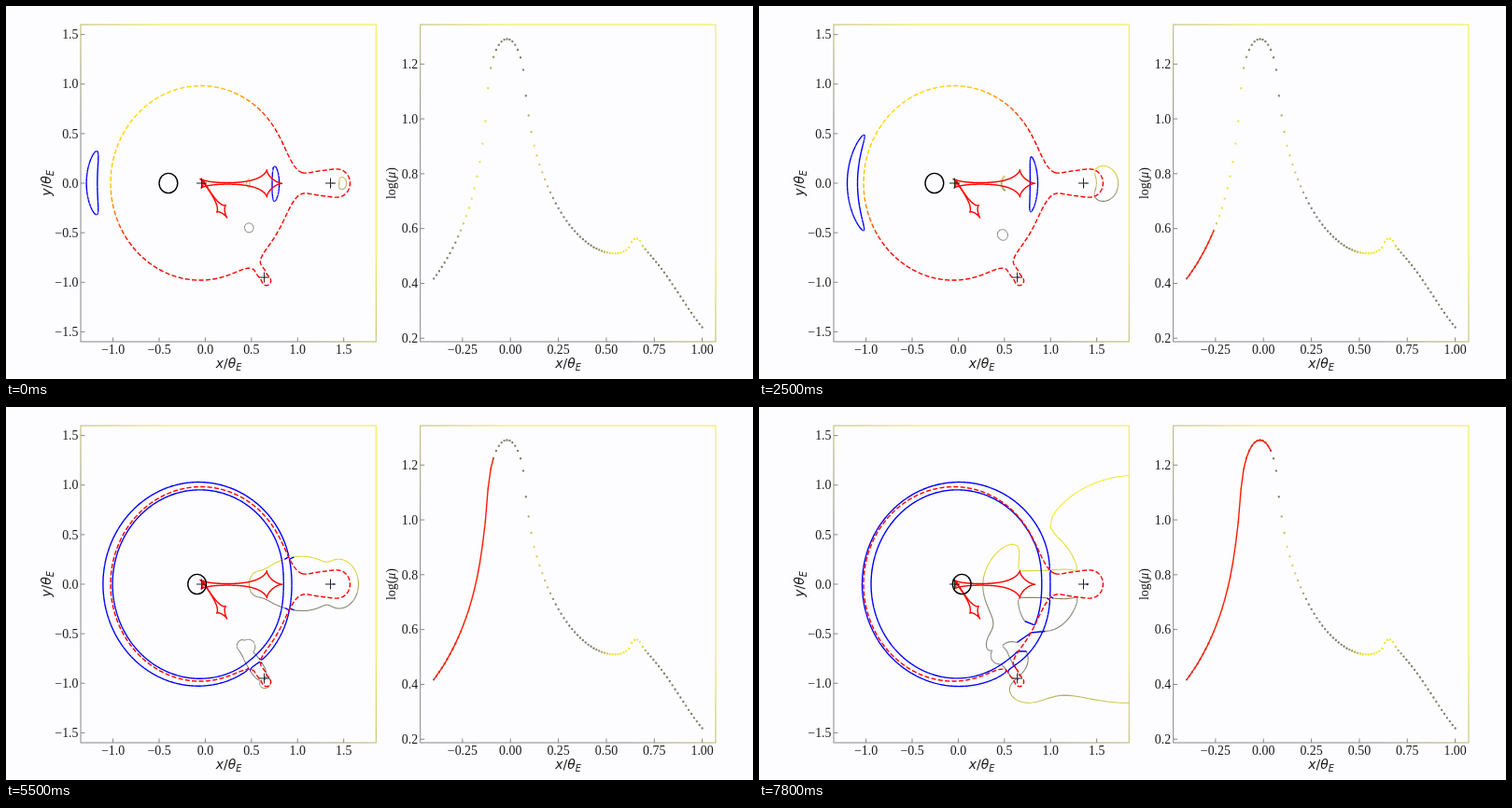
Recreate the animation shown at these times as an HTML page. Size 800 px wide and 400 px high, loop 8 s.

```html
<!DOCTYPE html>
<html lang="en">
<head>
<meta charset="utf-8">
<title>Triple lens images and light curve</title>
<style>
  html, body { margin: 0; width: 100%; height: 100%; overflow: hidden; background: #fdfdff; }
  svg { display: block; }
  path, ellipse { fill: none; stroke-linejoin: round; }
  text { font: 13.9px "Liberation Serif", serif; fill: #1c1c1c; }
  .math { font: italic 13.9px "DejaVu Sans", sans-serif; }
  .mid { text-anchor: middle; }
  .end { text-anchor: end; }
  .up { font-style: normal; }
  .sub { font-size: 9.7px; }
  #axes, #ticks { stroke-width: 1; }
  #ticks { stroke: #888; }
  #ghost { stroke: url(#olive); stroke-width: 1.1; }
  #image { stroke: #00f; stroke-width: 1.4; }
  #critical { stroke: #f00; stroke-width: 1.4; stroke-dasharray: 5.1 2.3; }
  #caustic { stroke: #f00; stroke-width: 1.4; }
  #star { stroke: #000; stroke-width: 1.4; }
  #lenses { stroke: #222; stroke-width: 1; }
  #dots { stroke: url(#dotTint); stroke-width: 2.4; stroke-linecap: round; }
  #trace { stroke: #ff1a08; stroke-width: 1.4; }
</style>
</head>
<body>
<svg width="800" height="400" viewBox="0 0 800 400">
  <defs>
    <clipPath id="box"><rect x="80" y="20" width="316.3" height="340"/></clipPath>
    <linearGradient id="edge" x1="0" y1="1" x2="1" y2="0">
      <stop offset=".35" stop-color="#858585"/><stop offset=".65" stop-color="#f0ea40"/>
    </linearGradient>
    <linearGradient id="olive" gradientUnits="userSpaceOnUse" x1="0" y1="20" x2="0" y2="360">
      <stop offset=".25" stop-color="#f6ee30"/><stop offset=".46" stop-color="#ddd23c"/>
      <stop offset=".55" stop-color="#85806e"/><stop offset=".8" stop-color="#80807a"/>
      <stop offset=".9" stop-color="#e6de40"/>
    </linearGradient>
    <linearGradient id="warm" gradientUnits="userSpaceOnUse" x1="150" y1="90" x2="225" y2="185">
      <stop offset="0" stop-color="#ffe000"/><stop offset=".45" stop-color="#ffc000"/>
      <stop offset="1" stop-color="#f00"/>
    </linearGradient>
    <linearGradient id="dotTint" gradientUnits="userSpaceOnUse" x1="458" y1="0" x2="746" y2="0">
      <stop offset="0" stop-color="#7c7c70"/><stop offset=".08" stop-color="#88846a"/>
      <stop offset=".12" stop-color="#ece450"/><stop offset=".2" stop-color="#ece450"/>
      <stop offset=".23" stop-color="#80806c"/><stop offset=".34" stop-color="#80806c"/>
      <stop offset=".37" stop-color="#e4dc60"/><stop offset=".42" stop-color="#d8b878"/>
      <stop offset=".45" stop-color="#7c7c78"/><stop offset=".6" stop-color="#80806c"/>
      <stop offset=".66" stop-color="#f0e838"/><stop offset=".77" stop-color="#f0e838"/>
      <stop offset=".8" stop-color="#80806c"/>
    </linearGradient>
  </defs>
  <g id="axes" fill="none" stroke="url(#edge)">
    <rect x="80" y="20" width="316.3" height="340"/>
    <rect x="443.7" y="20" width="316.3" height="340"/>
  </g>
  <path id="ticks"/>
  <g id="labels">
    <text class="math mid" x="238.5" y="388">x<tspan class="up">/</tspan>θ<tspan class="sub" dy="2.5">E</tspan></text>
    <text class="math mid" x="602" y="388">x<tspan class="up">/</tspan>θ<tspan class="sub" dy="2.5">E</tspan></text>
    <text class="math mid" transform="translate(48 190) rotate(-90)">y<tspan class="up">/</tspan>θ<tspan class="sub" dy="2.5">E</tspan></text>
    <text class="mid" transform="translate(417 190) rotate(-90)">log(<tspan font-style="italic">μ</tspan>)</text>
  </g>
  <g clip-path="url(#box)">
    <path id="ghost"/>
    <path id="image"/>
    <path id="critical"/>
    <path id="caustic"/>
    <ellipse id="star" cy="190"/>
    <path id="lenses"/>
  </g>
  <path id="dots"/>
  <path id="trace"/>
</svg>
<script>
const start = performance.now();
const $ = id => document.getElementById(id);
const draw = (id, d) => $(id).setAttribute('d', d);

// Lens masses and positions in Einstein radii
const mass = [0.968738799, 0.028093425, 0.003167776];
const lens = [[-0.039343, 0], [1.356657, 0], [0.638936, -0.950874]];
const RHO = 0.1, FROM = -0.4, COUNT = 100, STEP = 1.4 / (COUNT - 1);

// Axes to pixels
const SX = 316.28 / 3.2, SY = 340 / 3.2;
const px = x => 80 + (x + 1.35) * SX;
const py = y => 190 - y * SY;
const qx = x => 443.72 + (x + 0.47) * 316.28 / 1.54;
const at = ([x, y]) => px(x).toFixed(2) + ' ' + py(y).toFixed(2);

// Complex polynomials, lowest power first
const mul = (p, q) => {
  const r = Array.from({ length: p.length + q.length - 1 }, () => [0, 0]);
  p.forEach(([a, b], i) => q.forEach(([c, d], j) => {
    r[i + j][0] += a * c - b * d;
    r[i + j][1] += a * d + b * c;
  }));
  return r;
};
const add = (p, q) => {
  const [l, s] = p.length < q.length ? [q, p] : [p, q];
  return l.map(([a, b], i) => s[i] ? [a + s[i][0], b + s[i][1]] : [a, b]);
};
const scale = (p, a, b = 0) => mul(p, [[a, b]]);
const product = list => list.reduce((p, q) => mul(p, q));

const factor = lens.map(([x, y]) => [[-x, -y], [1, 0]]);
// Sum over i of mass[i] times the product of the other polynomials
const mixed = f => mass
  .map((m, i) => scale(mul(f[(i + 1) % 3], f[(i + 2) % 3]), m))
  .reduce((p, q) => add(p, q));
const P = product(factor), Q = mixed(factor);

// Aberth iteration in place; roots keep their order from call to call
function solve(c, roots) {
  const n = c.length - 1;
  for (let it = 0; it < 80; it++) {
    let worst = 0;
    for (let i = 0; i < n; i++) {
      const [x, y] = roots[i];
      let [a, b] = c[n], u = 0, v = 0, t;
      for (let k = n - 1; k >= 0; k--) {
        t = u * x - v * y + a; v = u * y + v * x + b; u = t;
        t = a * x - b * y + c[k][0]; b = a * y + b * x + c[k][1]; a = t;
      }
      const m = u * u + v * v || 1e-300;
      const nx = (a * u + b * v) / m, ny = (b * u - a * v) / m;
      let sx = 0, sy = 0;
      for (let j = 0; j < n; j++) if (j !== i) {
        const dx = x - roots[j][0], dy = y - roots[j][1], d = dx * dx + dy * dy || 1e-300;
        sx += dx / d; sy -= dy / d;
      }
      const ex = 1 - nx * sx + ny * sy, ey = -nx * sy - ny * sx, e = ex * ex + ey * ey || 1e-300;
      const gx = (nx * ex + ny * ey) / e, gy = (ny * ex - nx * ey) / e;
      roots[i] = [x - gx, y - gy];
      worst = Math.max(worst, Math.hypot(gx, gy) / (1 + Math.hypot(x, y)));
    }
    if (worst < 1e-11) break;
  }
}
const guess = n => Array.from({ length: n }, (_, i) => {
  const a = 0.4 + i * 2 * Math.PI / n;
  return [0.2 + 1.1 * Math.cos(a), 1.1 * Math.sin(a)];
});

// Lens equation: where the ray seen at a point comes from
function trueSpot([x, y]) {
  let wx = x, wy = y;
  for (let i = 0; i < 3; i++) {
    const dx = x - lens[i][0], dy = y - lens[i][1], k = mass[i] / (dx * dx + dy * dy);
    wx -= k * dx; wy -= k * dy;
  }
  return [wx, wy];
}

function imagePoly(wx, wy) {
  const U = lens.map(([x, y]) => add(scale(P, wx - x, y - wy), Q));
  return add(mul([[-wx, -wy], [1, 0]], product(U)), scale(mul(P, mixed(U)), -1));
}

// Follow all ten roots around the rim of the star
function rimImages(cx) {
  const N = 600, roots = guess(10), path = { image: '', ghost: '' };
  let old, oldReal;
  for (let s = 0; s <= N; s++) {
    const a = s * 2 * Math.PI / N, w = [cx + RHO * Math.cos(a), RHO * Math.sin(a)];
    solve(imagePoly(...w), roots);
    const real = roots.map(z => {
      const v = trueSpot(z);
      return Math.hypot(v[0] - w[0], v[1] - w[1]) < 1e-4;
    });
    if (old) roots.forEach((z, i) => {
      if (Math.hypot(z[0] - old[i][0], z[1] - old[i][1]) < 0.3)
        path[real[i] || oldReal[i] ? 'image' : 'ghost'] += `M${at(old[i])}L${at(z)}`;
    });
    old = roots.slice();
    oldReal = real;
  }
  return path;
}

// One root visits the whole critical curve in six turns of the phase
function drawCritical() {
  const N = 500, roots = guess(6), P2 = mul(P, P), curve = [];
  const R = mixed(factor.map(f => mul(f, f)));
  for (let s = 0; s <= 6 * N; s++) {
    const a = s * 2 * Math.PI / N;
    solve(add(R, scale(P2, -Math.cos(a), -Math.sin(a))), roots);
    curve.push(roots[0]);
  }
  draw('critical', 'M' + curve.map(at).join('L'));
  draw('caustic', 'M' + curve.map(z => at(trueSpot(z))).join('L'));
}

// Magnification of the disc by inverse ray shooting
function lightCurve() {
  const h = 0.002, hits = new Array(COUNT).fill(0);
  for (let x = -1.6 + h / 2; x < 2.1; x += h)
    for (let y = -1.4 + h / 2; y < 1.4; y += h) {
      const [wx, wy] = trueSpot([x, y]);
      if (Math.abs(wy) >= RHO) continue;
      const half = Math.sqrt(RHO * RHO - wy * wy);
      const last = Math.min(COUNT - 1, Math.floor((wx + half - FROM) / STEP));
      for (let k = Math.max(0, Math.ceil((wx - half - FROM) / STEP)); k <= last; k++) hits[k]++;
    }
  return hits.map(n => Math.log10(n * h * h / (Math.PI * RHO * RHO)));
}

const mu = lightCurve(), low = Math.min(...mu), span = Math.max(...mu) - low;
const qy = v => 360 - 340 * ((v - low) / span + 0.05) / 1.1;
const points = mu.map((v, k) => qx(FROM + k * STEP).toFixed(2) + ' ' + qy(v).toFixed(2));
draw('dots', points.map(p => `M${p}h0`).join(''));

// Ticks and their labels
let ticks = '';
function label(x, y, v, digits, cls) {
  const t = document.createElementNS($('ticks').namespaceURI, 'text');
  t.setAttribute('x', x);
  t.setAttribute('y', y);
  t.setAttribute('class', cls);
  t.textContent = v.toFixed(digits).replace('-', '−');
  $('labels').append(t);
}
function xTick(x, v, digits) {
  ticks += `M${x} 360v-4.5`;
  label(x, 373, v, digits, 'mid');
}
function yTick(x, y, v) {
  ticks += `M${x} ${y}h4.5`;
  label(x - 2.5, y + 4.7, v, 1, 'end');
}
for (let v = -1.5; v <= 1.5; v += 0.5) {
  if (v > -1.5) xTick(px(v), v, 1);
  yTick(80, py(v), v);
}
for (let v = -0.25; v <= 1; v += 0.25) xTick(qx(v), v, 2);
for (let i = 1; i <= 6; i++) yTick(443.7, qy(i / 5), i / 5);
draw('ticks', ticks);

draw('lenses', lens.map(z => `M${at(z)}m-5.5 0h11m-5.5 -5.5v11`).join(''));
$('star').setAttribute('rx', RHO * SX);
$('star').setAttribute('ry', RHO * SY);
drawCritical();

const cache = [];
let shown = -1;
function show(k) {
  const x = FROM + k * STEP;
  const path = cache[k] || (cache[k] = rimImages(x));
  draw('image', path.image);
  draw('ghost', path.ghost);
  draw('trace', 'M' + points.slice(0, k + 1).join('L'));
  $('star').setAttribute('cx', px(x));
  $('critical').style.stroke = k < 20 ? 'url(#warm)' : '#f00';
}

// Steps last 300 ms and 200 ms in turn
function tick() {
  const t = (performance.now() - start) % 8000;
  const k = 2 * Math.floor(t / 500) + (t % 500 >= 300 ? 1 : 0);
  if (k !== shown) show(shown = k);
  requestAnimationFrame(tick);
}
tick();
</script>
</body>
</html>
```
